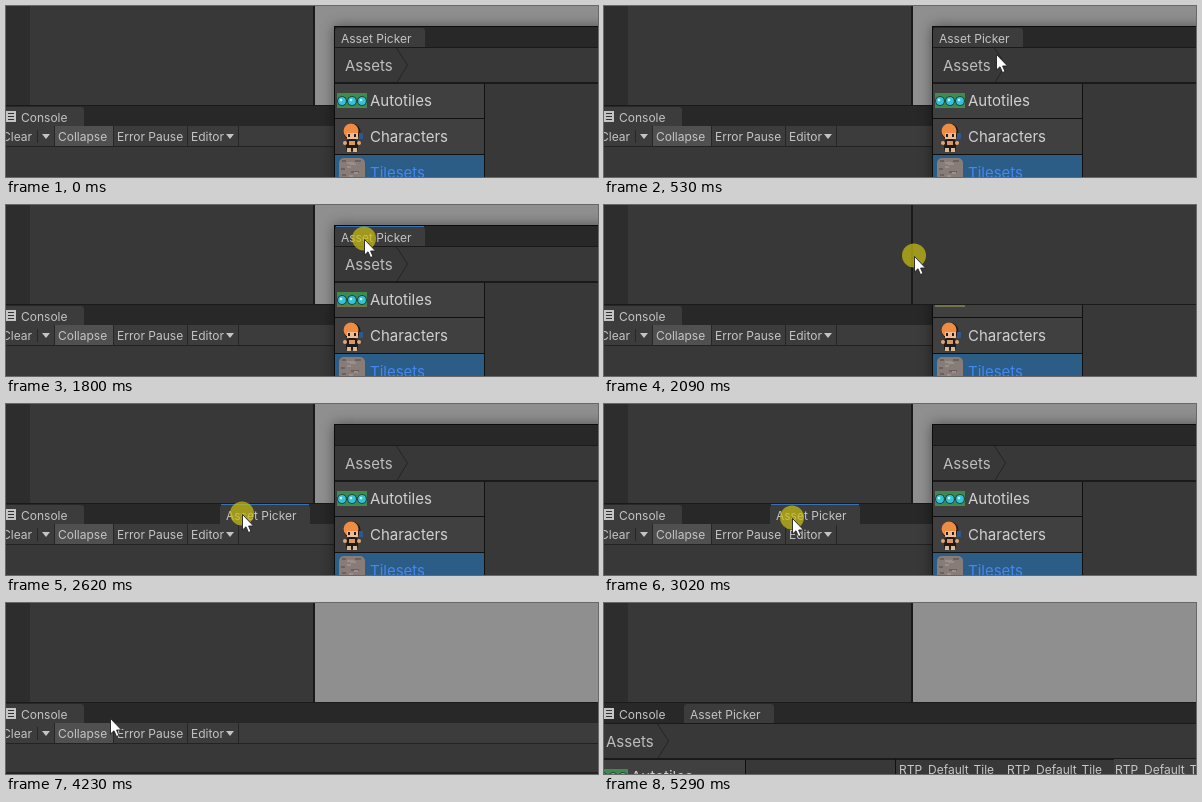
An HTML page with a canvas that plays this animation: 592x171 px, repeating every 6080 ms.

```html
<!DOCTYPE html>
<html lang="en">
<head>
<meta charset="utf-8">
<title>Docking a tab</title>
<style>
html, body { margin: 0; width: 100%; height: 100%; overflow: hidden; background: #383838; }
canvas { display: block; }
</style>
</head>
<body>
<canvas id="stage" width="592" height="171"></canvas>
<script>
const ctx = document.getElementById('stage').getContext('2d');
const W = 592, H = 171, LOOP = 6080;
const PRESS = 1560, LEAVE_STRIP = 1900, PREVIEW_END = 2250, OVER_TABS = 2470, DROP = 4230, DOCKED = 4260;
const PANEL = '#383838', STRIP = '#282828', TAB = '#3c3c3c', EDGE = '#1a1a1a', TEXT = '#c4c4c4';
const TAB_W = 90, ROW_H = 36;

const linear = k => k;
const easeOut = k => 1 - (1 - k) ** 2;

// Pointer legs; it rests between them
const START = { x: 524, y: H + 1 };
const LEGS = [
  { from: 120, to: 740, x: 375, y: 32, ease: easeOut },
  { from: 790, to: 1150, x: 371, y: 29, ease: easeOut },
  { from: 1720, to: 2090, x: 310, y: 51, ease: linear },
  { from: 2090, to: 2620, x: 236, y: 110, ease: linear },
  { from: 2620, to: 2890, x: 204, y: 114, ease: linear },
  { from: 2940, to: 3440, x: 104, y: 115, ease: linear },
  { from: 4730, to: 5290, x: 566, y: H + 1, ease: linear }
];

function pointerAt(t) {
  let { x, y } = START;
  for (const leg of LEGS) {
    if (t < leg.from) break;
    const k = leg.ease(Math.min(1, (t - leg.from) / (leg.to - leg.from)));
    x += (leg.x - x) * k;
    y += (leg.y - y) * k;
  }
  return [Math.round(x), Math.round(y)];
}

function box(x, y, w, h, color) {
  ctx.fillStyle = color;
  ctx.fillRect(x, y, w, h);
}

function rounded(x, y, w, h, r, color) {
  ctx.beginPath();
  ctx.roundRect(x, y, w, h, r);
  ctx.fillStyle = color;
  ctx.fill();
}

function disc(x, y, r, color) {
  ctx.beginPath();
  ctx.arc(x, y, r, 0, Math.PI * 2);
  ctx.fillStyle = color;
  ctx.fill();
}

function label(str, x, y, size = 12, color = TEXT) {
  ctx.font = size + 'px Inter, "Liberation Sans", sans-serif';
  ctx.fillStyle = color;
  ctx.fillText(str, x, y);
}

function trace(points) {
  ctx.beginPath();
  points.forEach(([x, y]) => ctx.lineTo(x, y));
}

function arrowDown(x) {
  trace([[x, 128], [x + 8, 128], [x + 4, 133]]);
  ctx.fillStyle = TEXT;
  ctx.fill();
}

function tab(str, x, y, w, textX, focused) {
  rounded(x, y, w, 20, [3, 3, 0, 0], TAB);
  if (focused) box(x + 1, y - 1, w - 2, 1, '#3a72b0');
  label(str, textX, y + 15);
}

function editor() {
  box(0, 0, W, H, PANEL);
  box(0, 0, 24, 99, '#2d2d2d');
  box(309, 0, W - 309, 99, '#8f8f8f');
  box(307, 0, 2, 99, EDGE);
  box(0, 99, W, 1, EDGE);
  box(0, 100, W, 21, STRIP);
}

function consoleTitle() {
  label('Console', 15, 116);
  box(0, 105, 10, 11, TEXT);
  for (let y = 107; y < 115; y += 3) box(2, y, 6, 1, '#303030');
}

function consolePane() {
  tab('', -10, 101, 88, 0);
  consoleTitle();
  box(0, 120, W, 20, TAB);
  box(0, 140, W, 1, '#232323');
  box(49, 120, 58, 20, '#505050');
  let x = -8;
  for (const [name, right] of [['Clear', 48], ['Collapse', 107], ['Error Pause', 181], ['Editor', 232]]) {
    label(name, x + 4, 135);
    box(right, 120, 1, 20, '#262626');
    x = right;
  }
  box(31, 124, 1, 13, '#262626');
  arrowDown(36);
  arrowDown(220);
}

function tilesIcon() {
  box(331, 87, 30, 15, '#3f8a4c');
  for (let x = 336; x < 361; x += 10) {
    disc(x, 95, 4.8, '#16343c');
    disc(x, 95, 3.9, '#35c3dc');
    disc(x - 1, 94, 1.3, '#c8f4f2');
  }
  box(331, 101, 30, 1, '#76744a');
}

function heroIcon() {
  const mid = 346;
  disc(mid, 126, 8.5, '#241a16');
  disc(mid - 1, 125, 7.5, '#ee8c44');
  box(mid - 5, 127, 11, 6, '#f0bd92');
  box(mid + 7, 127, 4, 6, '#2d5791');
  rounded(mid - 6, 134, 12, 11, 2, '#201a1a');
  box(mid - 3, 135, 6, 4, '#d99764');
  for (const side of [-1, 1]) {
    box(mid + side * 3 - 1, 128, 2, 3, '#1d1d2c');
    disc(mid + side * 7, 137, 2, '#e2a676');
    box(mid + side * 3 - 2, 142, 4, 4, '#d9b992');
  }
}

function rockIcon() {
  rounded(333, 152, 26, 24, 5, '#877c77');
  for (let i = 0; i < 14; i++) {
    const rnd = n => Math.abs(Math.sin(i * 12.9 + n * 78.2) * 4375.8) % 1;
    box(335 + Math.floor(rnd(1) * 18), 154 + Math.floor(rnd(2) * 16), 4, 2, i % 2 ? '#6b625e' : '#9a8f89');
  }
}

// Breadcrumb and category list, in floating-window coordinates
function picker() {
  box(329, 41, 700, 36, PANEL);
  box(329, 41, 700, 1, EDGE);
  trace([[390.5, 42], [401.5, 59], [390.5, 77]]);
  ctx.strokeStyle = '#242424';
  ctx.lineWidth = 1;
  ctx.stroke();
  label('Assets', 339, 65, 15, '#bdbdbd');
  box(329, 77, 700, 150, PANEL);
  ['Autotiles', 'Characters', 'Tilesets'].forEach((name, i) => {
    const y = 77 + i * ROW_H, chosen = i === 2;
    box(329, y, 149, ROW_H - 1, chosen ? '#2c5d87' : '#404040');
    box(329, y + ROW_H - 1, 149, 1, '#101010');
    label(name, 364, y + 23, 15, chosen ? '#4288f0' : '#d0d0d0');
  });
  box(329, 76, 700, 2, EDGE);
  box(478, 78, 1, 150, '#101010');
  tilesIcon();
  heroIcon();
  rockIcon();
}

function floatingWindow(t) {
  ctx.save();
  ctx.shadowColor = 'rgba(0,0,0,.45)';
  ctx.shadowBlur = 12;
  box(328, 20, W, H, '#0c0c0c');
  ctx.restore();
  box(329, 21, W, 20, STRIP);
  if (t < LEAVE_STRIP) tab('Asset Picker', 329, 22, TAB_W, 335, t >= PRESS);
  picker();
}

function dockedPane() {
  consoleTitle();
  tab('Asset Picker', 80, 101, TAB_W, 86);
  ctx.save();
  ctx.translate(-337, 79);
  picker();
  ctx.restore();
  box(291, 156, 1, 15, '#101010');
  box(510, 156, 82, 15, '#404040');
  for (let x = 295; x < W; x += 108) label('RTP_Default_Tile', x, 171, 12, '#c8c8c8');
}

function dropPreview() {
  box(309, 0, W - 309, 99, PANEL);
  box(309, 99, W - 309, 1, EDGE);
}

function pointer(x, y) {
  ctx.save();
  ctx.translate(x, y);
  trace([[.5, .5], [.5, 16], [4, 12.8], [6.5, 18.5], [9, 17.5], [6.6, 12], [11.5, 12]]);
  ctx.closePath();
  ctx.fillStyle = '#fff';
  ctx.fill();
  ctx.strokeStyle = '#222';
  ctx.lineWidth = .9;
  ctx.lineJoin = 'round';
  ctx.stroke();
  ctx.restore();
}

function draw(t) {
  const [x, y] = pointerAt(t);
  editor();
  if (t < DOCKED) consolePane();
  else dockedPane();
  if (t >= OVER_TABS && t < DROP) tab('Asset Picker', x - 22, 101, TAB_W, x - 16, true);
  if (t < DROP) floatingWindow(t);
  else if (t < DOCKED) box(0, 169, W, 2, '#232323');
  if (t >= LEAVE_STRIP && t < PREVIEW_END) dropPreview();
  if (t >= PRESS && t < DROP) disc(x, y - .5, 12, 'rgba(200,190,20,.72)');
  pointer(x, y);
}

function tick() {
  draw(performance.now() % LOOP);
  requestAnimationFrame(tick);
}
tick();
</script>
</body>
</html>
```
